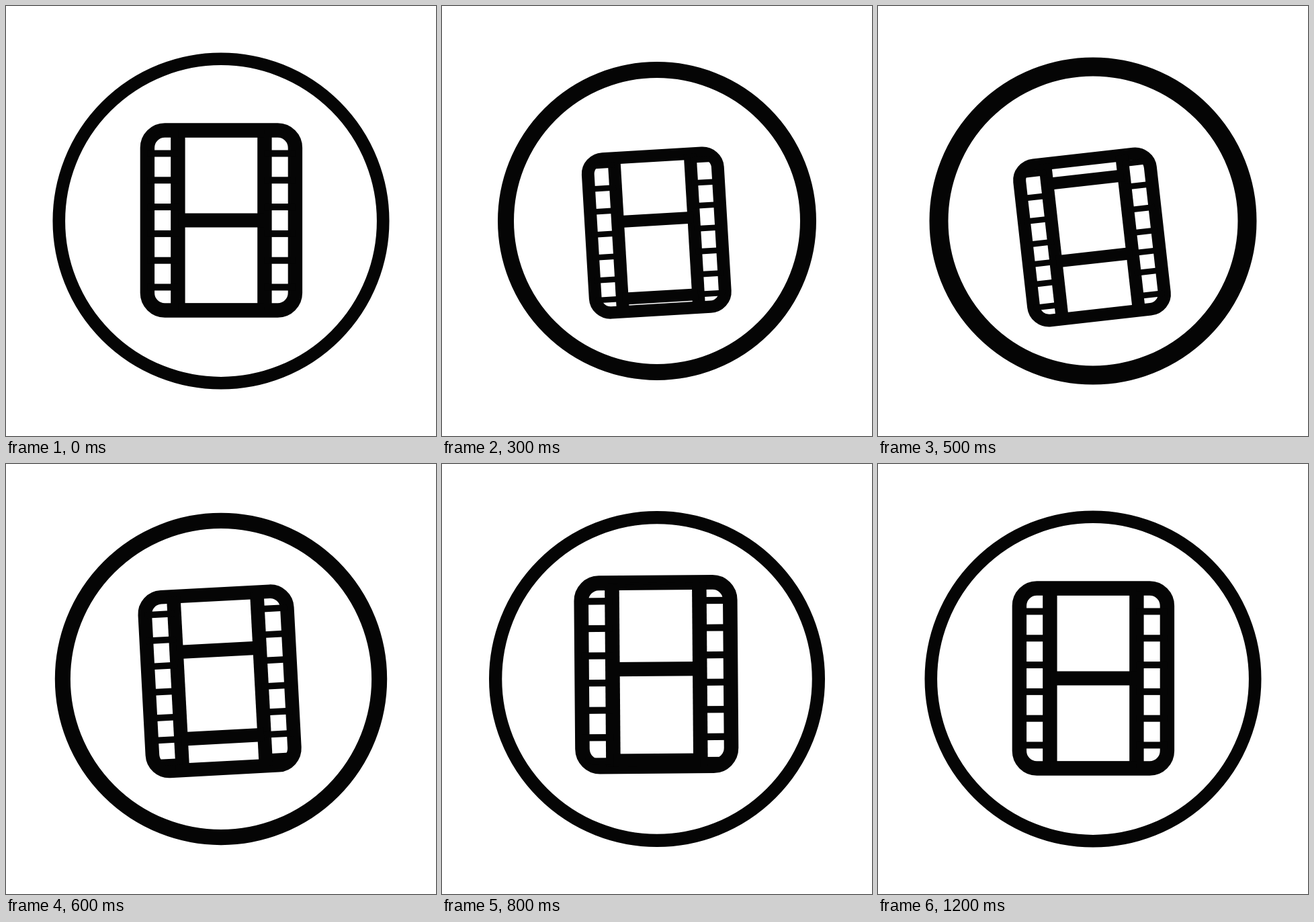
Write an HTML page with a canvas that moves like this. It is 640 px wide and 640 px high and loops after 1.4 s.

```html
<!DOCTYPE html>
<html lang="en">
<head>
<meta charset="utf-8">
<title>Film strip icon</title>
<style>
  html, body { margin: 0; width: 100%; height: 100%; overflow: hidden; background: #fff; }
  canvas { display: block; width: 640px; height: 640px; }
</style>
</head>
<body>
<canvas id="stage" width="640" height="640"></canvas>
<script>
const ctx = document.getElementById('stage').getContext('2d');
const LOOP = 1400, STEP = 100, INK = '#050505';
const STRIP = 268, HOLE = 39.8;

// The icon is pressed down, leans over, then springs back to rest.
const rest = { radius: 241.2, width: 18.6, x: 320.4, y: 319, sx: 1, sy: 1, tilt: 0, scroll: 0 };
const press = { radius: 225, width: 24, x: 319.3, y: 337.6, sx: 0.879, sy: 0.856, tilt: -3.4, scroll: -23 };
const lean = { radius: 229.5, width: 28, x: 318.5, y: 344, sx: 0.89, sy: 0.868, tilt: -6.4, scroll: -99 };
const overshoot = { x: -1.4, y: -7.6, sx: 0.015, sy: 0.029, scroll: -1 };

const progress = (t, from, to) => Math.min(1, Math.max(0, (t - from) / (to - from)));

function mix(a, b, u) {
  const pose = {};
  for (const key in a) pose[key] = a[key] + (b[key] - a[key]) * u;
  return pose;
}

function poseAt(t) {
  if (t < 300) return mix(rest, press, progress(t, 100, 300) ** 2);
  if (t < 500) return mix(press, lean, progress(t, 300, 500));
  const left = 1 - progress(t, 500, 1250);
  const pose = mix(rest, lean, left ** 5.2);
  const bounce = 11.5 * (1 - left) * left ** 3;
  for (const key in overshoot) pose[key] += overshoot[key] * bounce;
  return pose;
}

// Horizontal bar across the film
function bar(x1, x2, y, height) {
  ctx.fillRect(x1, y - height / 2, x2 - x1, height);
}

function drawStrip(y) {
  bar(-64, 64, y, 21);
  bar(-64, 64, y + STRIP / 2, 21);
  const marks = [STRIP / 2];
  for (let i = -2.5; i <= 2.5; i++) marks.push(i * HOLE);
  for (const m of marks) {
    bar(-110, -64, y + m, 10);
    bar(64, 110, y + m, 10);
  }
}

function drawRing({ radius, width }) {
  ctx.lineWidth = width;
  ctx.beginPath();
  ctx.arc(320, 320, radius, 0, 2 * Math.PI);
  ctx.stroke();
}

function drawFilm({ x, y, sx, sy, tilt, scroll }) {
  ctx.save();
  ctx.translate(x, y);
  ctx.rotate(tilt * Math.PI / 180);
  ctx.scale(sx, sy);

  ctx.beginPath();
  ctx.roundRect(-110, -134, 220, 268, 26);
  ctx.lineWidth = 21.4;
  ctx.stroke();
  ctx.clip();
  for (const side of [-1, 1]) ctx.fillRect(side * 64.5 - 10.7, -134, 21.4, 268);
  for (const copy of [-1, 0, 1]) drawStrip(scroll + copy * STRIP);
  ctx.restore();
}

const start = performance.now();
function tick() {
  const time = (performance.now() - start) % LOOP;
  const pose = poseAt(Math.floor(time / STEP) * STEP);
  ctx.fillStyle = '#fff';
  ctx.fillRect(0, 0, 640, 640);
  ctx.fillStyle = ctx.strokeStyle = INK;
  drawRing(pose);
  drawFilm(pose);
  requestAnimationFrame(tick);
}
tick();
</script>
</body>
</html>
```
